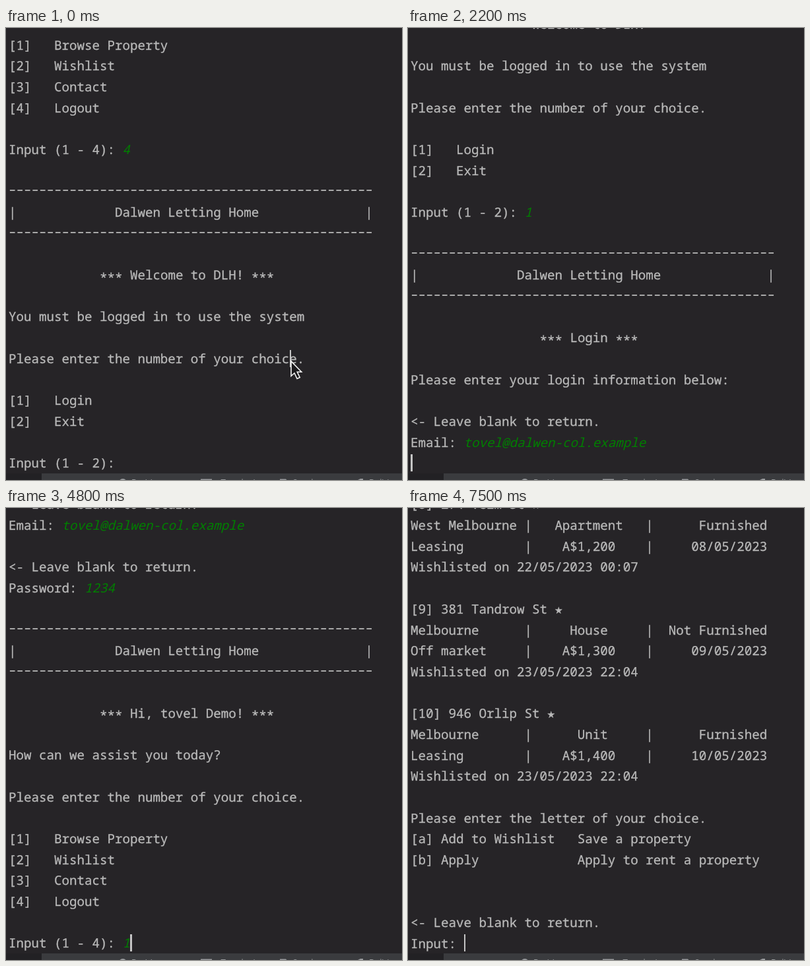
These frames come from a looping animation (600x685 px, 8000 ms). An HTML page:

```html
<!DOCTYPE html>
<html lang="en">
<head>
<meta charset="utf-8">
<style>
  html, body { margin: 0; width: 100%; height: 100%; overflow: hidden; background: #262427; }
  #stage { position: relative; width: 600px; height: 685px; overflow: hidden; }
  #view { position: absolute; width: 600px; height: 675px; overflow: hidden; }
  #log { position: absolute; left: 4px; }
  pre {
    margin: 0; color: #bababa; white-space: pre;
    font: 19.167px/31.667px "Noto Sans Mono", "DejaVu Sans Mono", monospace;
    text-rendering: geometricPrecision; font-variant-ligatures: none;
    -webkit-text-stroke: 0.3px;
  }
  pre i { color: #007f00; -webkit-text-stroke: 0; }
  pre b { font-weight: inherit; position: relative; top: 3.5px; }
  pre s {
    color: transparent; text-decoration: none;
    background: linear-gradient(90deg, #a8a8a8 7.6px, transparent 0) 1.9px 11px / 11.5px 2px repeat-x;
  }
  #caret { position: absolute; width: 2.5px; height: 26px; background: #c4c4c4; }
  svg { position: absolute; left: 0; top: 0; }
</style>
</head>
<body>
<div id="stage">
  <div id="view"><div id="log"><pre></pre><div id="caret"></div></div></div>
  <svg width="600" height="685">
    <path id="arrow" d="M432 505v22.500l5-4.500 4 8.500 4.200-2-4-8.200h6.500z" fill="#1c1b1d" stroke="#f4f4f4" stroke-width="1.600"/>
    <path d="M0 675h54v10H0z" fill="#222124"/>
    <path d="M54 675h546v10H54z" fill="#3a3b3e"/>
    <g fill="#999b9d" font-family="Inter, sans-serif" font-size="13">
      <circle cx="177" cy="689.500" r="6.500"/>
      <path d="M295 683.500h17v3h-17zM415 683.500h9l3 3h-12zM533 685l4-2h4v2z"/>
      <text x="190" y="694">Problems</text>
      <text x="325" y="694">Terminal</text>
      <text x="434" y="694">Services</text>
      <text x="550" y="694">Build</text>
    </g>
  </svg>
</div>
<script>
const LOOP = 8000, TICK = 100, COL = 11.5, ROW = 31.667, TOP = 10.7;

const indent = (n, text) => ' '.repeat(n) + text;
const heading = (n, text) => indent(n, `<b>***</b> ${text} <b>***</b>`);
const options = (...names) => names.map((name, i) => `[${i + 1}]   ${name}`);
const rule = `<s>${'-'.repeat(48)}</s>`;
const banner = ['', rule, '|' + indent(13, 'Dalwen Letting Home') + indent(14, '|'), rule, ''];
const back = '&lt;- Leave blank to return.';
const choose = 'Please enter the number of your choice.';
const mainMenu = [...options('Browse Property', 'Wishlist', 'Contact', 'Logout'), '', 'Input (1 - 4): <i></i>'];

const streets = ['118 Hollin St', '229 Pellmar St', '335 Drisk St', '451 Wendrel St', '562 Sallow St',
  '673 Quarn St', '152 Marrowind St', '274 Velm St', '381 Tandrow St', '946 Orlip St'];
const kinds = ['Apartment', 'House', 'Unit', 'Townhouse'];
const wished = { 8: '22/05/2023 00:07', 9: '23/05/2023 22:04', 10: '23/05/2023 22:04' };

function tableRow(a, b, c) {
  const left = Math.ceil((15 - b.length) / 2);
  return `${a.padEnd(15)}|${indent(left, b).padEnd(15)}|${c.padStart(15)}`;
}

function listing(street, i) {
  const n = i + 1, even = n % 2 === 0;
  const price = 'A$' + (400 + n * 100).toLocaleString('en-US');
  return [
    `[${n}] ${street} ${wished[n] ? '★' : '☆'}`,
    tableRow(n === 8 ? 'West Melbourne' : 'Melbourne', kinds[n % 4], even ? 'Furnished' : 'Not Furnished'),
    tableRow(even ? 'Leasing' : 'Off market', price, String(n).padStart(2, '0') + '/05/2023'),
    ...(wished[n] ? ['Wishlisted on ' + wished[n]] : []),
    ''
  ];
}

const lines = [
  ...mainMenu,
  ...banner, heading(12, 'Welcome to DLH!'), '',
  'You must be logged in to use the system', '',
  choose, '', ...options('Login', 'Exit'), '', 'Input (1 - 2): <i></i>',
  ...banner, heading(17, 'Login'), '',
  'Please enter your login information below:', '',
  back, 'Email: <i></i>', '',
  back, 'Password: <i></i>',
  ...banner, heading(12, 'Hi, tovel Demo!'), '',
  'How can we assist you today?', '',
  choose, '', ...mainMenu,
  ...banner, heading(12, 'Browse Property'), '',
  ...streets.flatMap(listing),
  'Please enter the letter of your choice.',
  '[a] Add to Wishlist   Save a property',
  '[b] Apply             Apply to rent a property',
  '', '', back, 'Input: '
];
const last = lines.length - 1;

// text, start time, delay per character (0: all at once)
const inputs = [
  ['4', 0, 0], ['1', 100, 0], ['tovel@dalwen-col.example', 1700, 0], ['1234', 2700, 200], ['1', 4700, 0]
];

// time, first visible row
const scroll = [
  [0, 0], [400, 0], [500, 1], [800, 1], [900, 5.18], [1000, 11],
  [1900, 11], [2000, 12], [2400, 12], [2500, 14],
  [3400, 14], [3500, 15], [3900, 15], [4000, 22], [4100, 31],
  [4800, 31], [4900, 32], [5000, 32], [5100, last - 36], [5200, last - 24.18], [5300, last - 20], [LOOP, last - 20]
];

// time, column, row (no row: caret is off)
const carets = [
  [0, 37, 15], [100, 16, 20], [500, 0, 21], [800, 7, 31], [1500], [1700, 31, 31], [2000, 0, 32],
  [2400, 10, 34], [2700, 11, 34], [2900, 12, 34], [3100, 13, 34], [3300, 14, 34], [3500, 0, 35],
  [3900, 15, 51], [4700, 16, 51], [4900, 0, 52], [5000, 7, last],
  [6000], [6500, 7, last], [7000], [7500, 7, last]
];

const $ = id => document.getElementById(id);
const log = $('log'), caret = $('caret'), arrow = $('arrow');
const pre = log.firstChild;
pre.innerHTML = lines.join('\n');
const fields = pre.querySelectorAll('i');

function firstRow(t) {
  const i = scroll.findIndex(key => key[0] > t);
  const [t0, r0] = scroll[i - 1], [t1, r1] = scroll[i];
  return r0 + (r1 - r0) * (t - t0) / (t1 - t0);
}

function draw(t) {
  log.style.top = TOP - firstRow(t) * ROW + 'px';
  inputs.forEach(([text, start, delay], i) => {
    const count = t < start ? 0 : delay ? Math.floor((t - start) / delay) + 1 : text.length;
    fields[i].textContent = text.slice(0, count);
  });
  const [, col, row] = carets.filter(c => c[0] <= t).pop();
  caret.hidden = row === undefined;
  if (!caret.hidden) {
    caret.style.left = col * COL + 0.3 + 'px';
    caret.style.top = row * ROW + 2 + 'px';
  }
  arrow.style.display = t < 100 ? '' : 'none';
}

function frame() {
  draw(Math.floor(performance.now() % LOOP / TICK) * TICK);
  requestAnimationFrame(frame);
}
frame();
</script>
</body>
</html>
```
